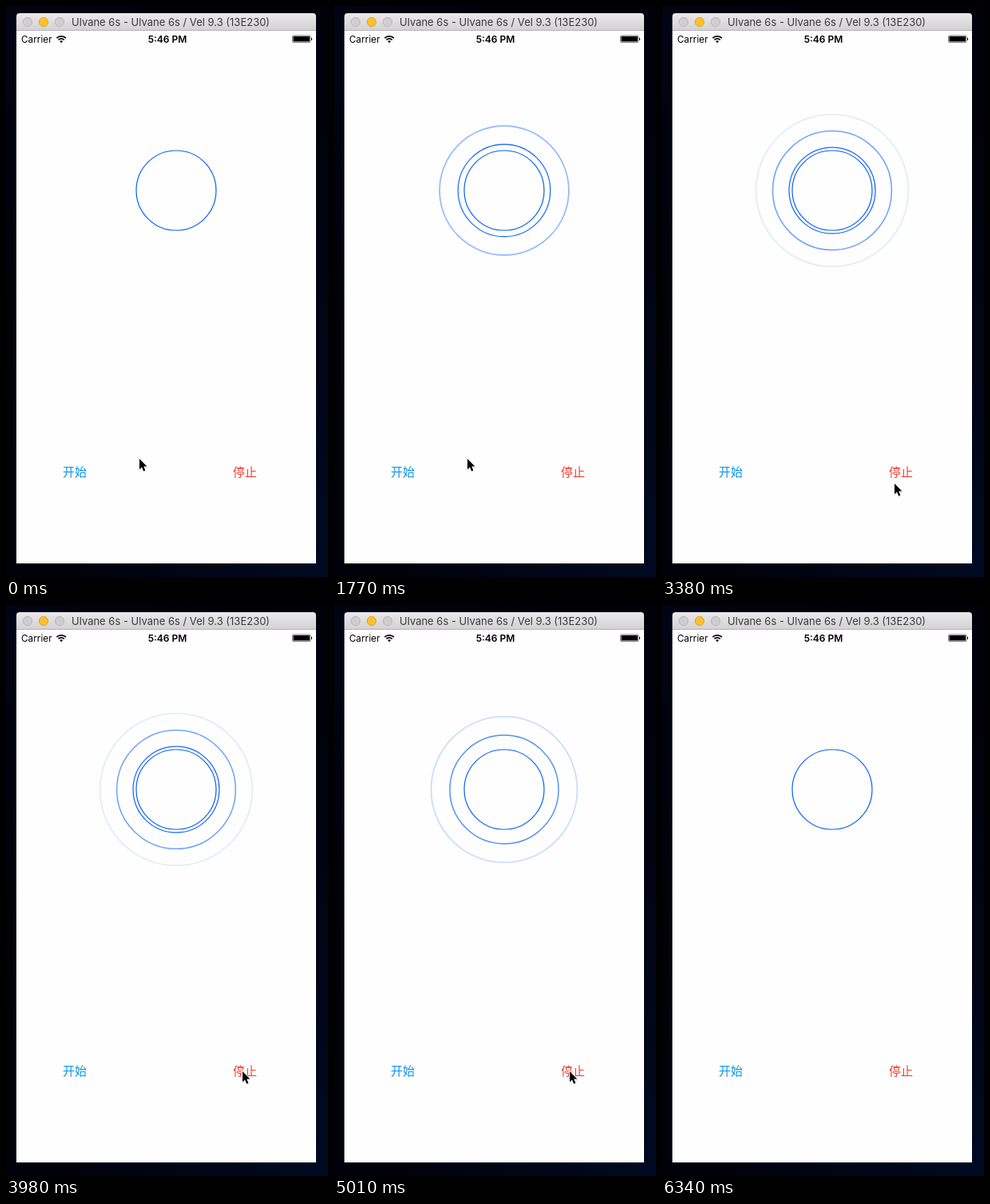
An HTML page for the animation above (6790 ms loop, 403 by 715 pixels).

```html
<!DOCTYPE html>
<html lang="zh">
<head>
<meta charset="utf-8">
<title>Ripple</title>
<style>
  html, body { margin: 0; width: 100%; height: 100%; overflow: hidden; background: #00020b; }
  svg { display: block; width: 403px; height: 715px; }
  text { font-family: Inter, "Open Sans", sans-serif; }
  .button { font: 15px "Noto Sans CJK SC", "Noto Sans CJK", sans-serif; }
  .ring { fill: none; stroke: #0b61f5; }
</style>
</head>
<body>
<svg viewBox="0 0 403 715">
  <defs>
    <linearGradient id="desk" x2="1" y2="1">
      <stop offset="0" stop-color="#000413"/>
      <stop offset=".3" stop-color="#000208"/>
      <stop offset=".6" stop-color="#00020b"/>
      <stop offset="1" stop-color="#010a22"/>
    </linearGradient>
    <linearGradient id="bar" x2="0" y2="1">
      <stop offset="0" stop-color="#ebe9eb"/>
      <stop offset="1" stop-color="#d2d0d2"/>
    </linearGradient>
  </defs>

  <rect width="403" height="715" fill="url(#desk)"/>
  <path d="M13 31V13a4 4 0 0 1 4-4H384a4 4 0 0 1 4 4V31Z" fill="url(#bar)"/>
  <path d="M13 30.5H388" stroke="#b5b3b5"/>
  <rect x="13" y="31" width="375" height="667" fill="#fefefe"/>
  <g fill="#d0ced0" stroke="#b8b6b8">
    <circle cx="27" cy="20" r="5.6"/>
    <circle cx="47" cy="20" r="5.6" fill="#ffbf2d" stroke="#e0a32a"/>
    <circle cx="67" cy="20" r="5.6"/>
  </g>
  <text x="82" y="25" font-size="13" fill="#3c3a3c">Ulvane 6s - Ulvane 6s / Vel 9.3 (13E230)</text>

  <text x="19" y="46" font-size="11.8">Carrier</text>
  <text x="202" y="46" font-size="12" font-weight="600" text-anchor="middle">5:46 PM</text>
  <g fill="none" stroke="#000" stroke-width="1.7">
    <path d="M63.4 40.2a8.2 8.2 0 0 1 11.6 0M65.6 42.4a5.1 5.1 0 0 1 7.2 0"/>
    <path d="M69.2 46.2l-2-2.1a2.9 2.9 0 0 1 4 0Z" fill="#000" stroke="none"/>
  </g>
  <rect x="358.5" y="37" width="22.6" height="8.6" rx="1.6" fill="none" stroke="#555" stroke-width=".8"/>
  <rect x="359.5" y="38" width="20.6" height="6.6" rx=".6"/>
  <path d="M382 39.6a2 2 0 0 1 0 3.6Z"/>

  <circle class="ring" cx="213" cy="231" r="50" stroke-width="1.2"/>
  <g id="rings"></g>

  <text class="button" x="71" y="588.5" fill="#0894f2">开始</text>
  <text class="button" id="stop" x="284" y="588.5" fill="#f23d2e">停止</text>

  <g id="cursor">
    <path d="M0 1.5V15L3.2 12.4L5.2 17L8 15.8L6 11.4H10.4Z" fill="#000" opacity=".2"/>
    <path d="M0 0V13.2L3 10.5L5.1 15.4L7.4 14.4L5.3 9.6H9.4Z" stroke="#fff" stroke-width="1.8" paint-order="stroke"/>
  </g>
</svg>
<script>
const LOOP = 6790, STEP = 147.4, LEAD = 12;
const FIRST = 40, PERIOD = 591, COUNT = 8, LIFE = 2000;
const PATH = [ // time, x, y of the pointer tip
  [0, 167, 567], [2060, 167, 567], [2350, 179, 575], [2500, 179, 575],
  [3240, 291, 598], [3390, 291, 598], [3530, 295, 589], [3680, 296, 584],
  [4720, 296, 584], [4860, 295, 584], [6180, 295, 584], [6190, 295, 585], [LOOP, 295, 585]
];
const $ = id => document.getElementById(id);

const rings = Array.from({ length: COUNT }, () => {
  const c = document.createElementNS('http://www.w3.org/2000/svg', 'circle');
  c.setAttribute('class', 'ring');
  c.setAttribute('cx', 213);
  c.setAttribute('cy', 231);
  return $('rings').appendChild(c);
});

// cubic-bezier(.42, 0, .58, 1)
function easeInOut(x) {
  let lo = 0, hi = 1, u = .5;
  for (let i = 0; i < 20; i++) {
    u = (lo + hi) / 2;
    const bx = 3 * u * (1 - u) * (.42 * (1 - u) + .58 * u) + u ** 3;
    if (bx < x) lo = u; else hi = u;
  }
  return u * u * (3 - 2 * u);
}

function drawRing(ring, age) {
  const p = easeInOut(Math.min(Math.max(age / LIFE, 0), 1));
  const seen = age > 0 && p < .945;
  ring.setAttribute('visibility', seen ? 'visible' : 'hidden');
  ring.setAttribute('r', 50 * (1 + p));
  ring.setAttribute('stroke-width', 1.2 + .7 * p);
  ring.setAttribute('stroke-opacity', (1 - p) * (1 + .25 * p));
}

function pointer(t) {
  const i = PATH.findIndex(k => k[0] > t);
  const [t0, x0, y0] = PATH[i - 1], [t1, x1, y1] = PATH[i];
  const k = (t - t0) / (t1 - t0), e = k * k * (3 - 2 * k);
  return [x0 + (x1 - x0) * e, y0 + (y1 - y0) * e];
}

const start = performance.now();
function draw() {
  const now = (performance.now() - start) % LOOP;
  const t = Math.floor((now + LEAD) / STEP) * STEP;
  rings.forEach((ring, i) => drawRing(ring, t - FIRST - i * PERIOD));
  $('cursor').setAttribute('transform', `translate(${pointer(t)})`);
  $('cursor').setAttribute('visibility', t < 6300 ? 'visible' : 'hidden');
  $('stop').setAttribute('opacity', t < 4700 || t > 4950 ? 1 : t < 4800 ? .3 : .7);
  requestAnimationFrame(draw);
}
draw();
</script>
</body>
</html>
```
